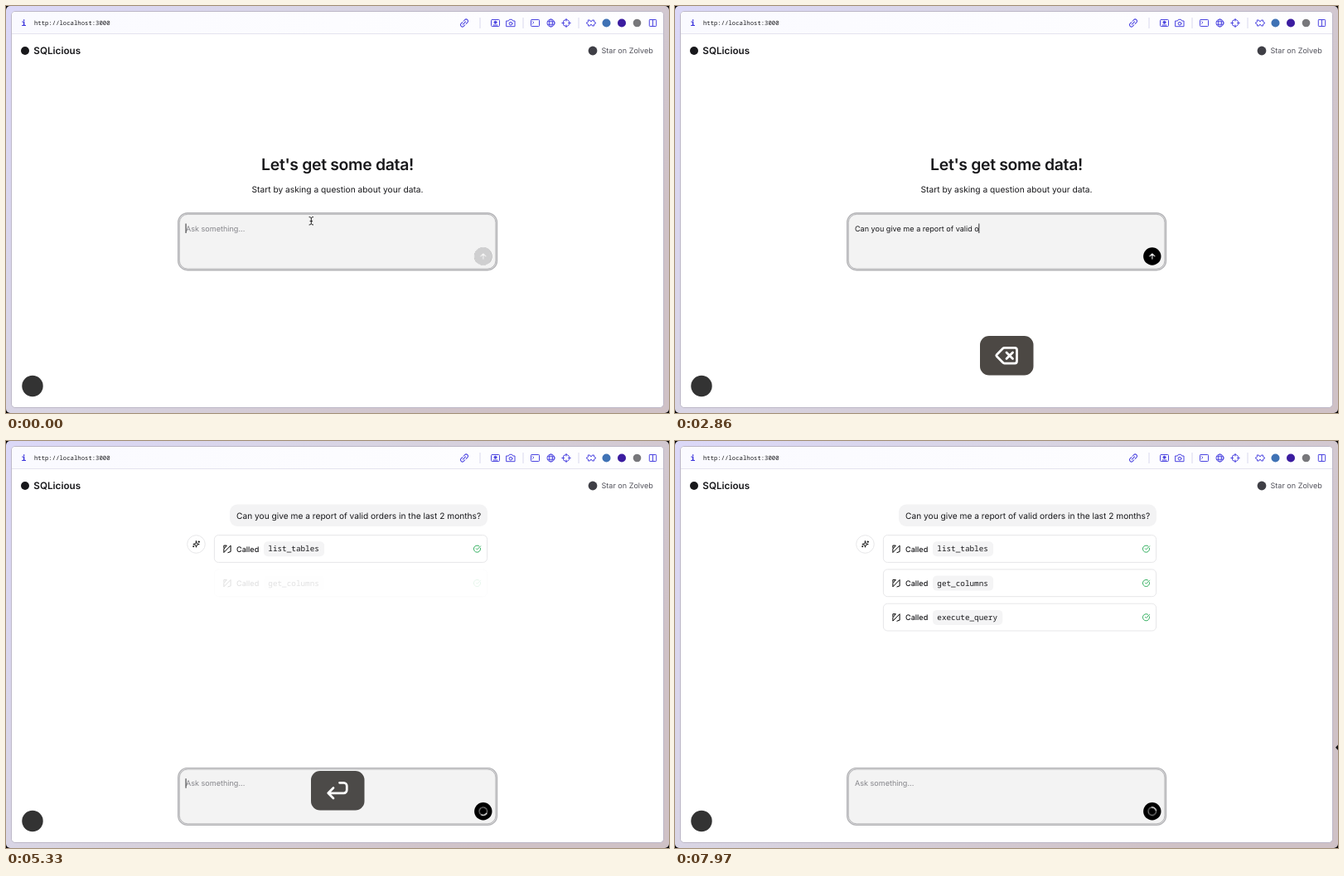
An HTML page that plays this animation: 800 by 491 pixels, repeating every 8 s.

```html
<!DOCTYPE html>
<html lang="en">
<head>
<meta charset="utf-8">
<title>SQLicious</title>
<style>
  html, body { margin: 0; width: 100%; height: 100%; overflow: hidden; background: #000; }
  svg { display: block; width: 800px; height: 491px; }
  text { font-family: Inter, sans-serif; white-space: pre; text-rendering: geometricPrecision; fill: #18181b; }
  .mono { font-family: "Noto Sans Mono", monospace; font-weight: 500; }
  .line { fill: none; stroke: currentColor; stroke-linecap: round; stroke-linejoin: round; }
  .bar { color: #4a43e0; stroke-width: 1; }
  .sep { stroke: #d9d8ee; }

  .home, .chat, .box, .bubble, .row1, .row2, .row3, .edge, .mouse, .idle, .back, .enter { animation: 8s linear infinite; }
  .home { animation-name: home; }
  .chat { animation-name: chat; }
  .box { animation-name: drop; }
  .bubble { animation-name: bubble; }
  .row1 { animation-name: row1; }
  .row2 { animation-name: row2; }
  .row3 { animation-name: row3; }
  .edge { animation-name: edge; }
  .mouse, .idle { animation-name: firstkey; }
  .back { animation-name: back; }
  .enter { animation-name: enter; }
  .spin { animation: spin 1s linear infinite; }

  @keyframes home { 0%, 59.12% { opacity: 1 } 59.13%, 100% { opacity: 0 } }
  @keyframes chat { 0%, 59.12% { opacity: 0 } 59.13%, 100% { opacity: 1 } }
  @keyframes drop { 0%, 59.12% { transform: none } 59.13%, 100% { transform: translateY(144.7px) } }
  @keyframes bubble { 0%, 59.12% { opacity: 0 } 61.5%, 100% { opacity: 1 } }
  @keyframes row1 { 0%, 61% { opacity: 0 } 64%, 100% { opacity: 1 } }
  @keyframes row2 { 0%, 66.25% { opacity: 0 } 69.25%, 100% { opacity: 1 } }
  @keyframes row3 { 0%, 75% { opacity: 0 } 78%, 100% { opacity: 1 } }
  @keyframes edge { 0%, 69% { opacity: 0 } 69.01%, 100% { opacity: 1 } }
  @keyframes firstkey { 0%, 1.24% { opacity: 1 } 1.25%, 100% { opacity: 0 } }
  @keyframes back { 0%, 27% { opacity: 0 } 27.6%, 37% { opacity: 1 } 39%, 100% { opacity: 0 } }
  @keyframes enter { 0%, 58.8% { opacity: 0 } 59.6%, 68% { opacity: 1 } 70%, 100% { opacity: 0 } }
  @keyframes spin { to { transform: rotate(360deg) } }
</style>
</head>
<body>
<svg viewBox="0 0 800 491">
  <defs>
    <linearGradient id="desk" x2="1" y2=".5">
      <stop offset="0" stop-color="#dbd8f8"/>
      <stop offset=".45" stop-color="#d8d4e2"/>
      <stop offset="1" stop-color="#cfc1c6"/>
    </linearGradient>
    <linearGradient id="tools">
      <stop offset="0" stop-color="#fafaff"/>
      <stop offset="1" stop-color="#fefeff"/>
    </linearGradient>
    <path id="spark" d="M12 3l2 7 7 2-7 2-2 7-2-7-7-2 7-2zM20 3v4M22 5h-4M4 17v3M5.500 18.500h-3"/>
    <path id="done" d="M21.800 10A10 10 0 1 1 17 3.335M9 11l3 3L22 4"/>
    <path id="tool" d="M-4.400-1.200V-4.200H-1L-4.400 0V4.200L3.800-4.200V3.200L.600 4.300"/>
    <path id="up" class="line" stroke-width="1.100" d="M0 3.100V-3.100M-3-.100L0-3.100 3-.100"/>
  </defs>

  <!-- window -->
  <rect width="800" height="491" rx="5" fill="url(#desk)"/>
  <rect x="6.500" y="6.500" width="787" height="478" rx="4.500" fill="#fff" stroke="#bdb8c8"/>
  <path d="M7 33.500V11a4 4 0 0 1 4-4H789a4 4 0 0 1 4 4V33.500z" fill="url(#tools)"/>
  <path d="M7 33.500H793" stroke="#e4e3ee"/>

  <!-- browser bar -->
  <text class="mono" x="21.500" y="24" font-size="10" text-anchor="middle" style="fill:#3d35dc;font-weight:700">i</text>
  <text class="mono" x="34" y="23" font-size="7.270">http://localhost:3000</text>
  <g class="sep"><path d="M572 14v13M624 14v13M691 14v13"/></g>
  <g class="line bar">
    <g transform="translate(553 20.500) rotate(-45)">
      <path d="M-1-2.200H-3.200a2.200 2.200 0 0 0 0 4.400H-1M1-2.200H3.200a2.200 2.200 0 0 1 0 4.400H1M-2.400 0h4.800"/>
    </g>
    <g transform="translate(590.500 20.500)">
      <rect x="-5" y="-4" width="10" height="8" rx="1"/>
      <circle cy="-.800" r="1.500" fill="currentColor"/><path d="M-2.500 2.500h5"/>
    </g>
    <g transform="translate(609 20.500)">
      <path d="M-5-2.500h2.400l1-1.700h3.200l1 1.700H5v6.700H-5z"/><circle cy=".700" r="1.900"/>
    </g>
    <g transform="translate(638.500 20.500)">
      <rect x="-5" y="-4" width="10" height="8" rx=".800"/><path d="M-3-1.800l1.300 1.300L-3 .800"/>
    </g>
    <g transform="translate(657.500 20.500)">
      <circle r="4.500"/><ellipse rx="2" ry="4.500"/><path d="M-4-1.700h8M-4 1.700h8"/>
    </g>
    <g transform="translate(676 20.500)">
      <circle r="4"/><path d="M0-5.200v2.700M0 5.200v-2.700M-5.200 0h2.700M5.200 0h-2.700"/>
    </g>
    <path transform="translate(706 20.500)" d="M-3.500-3.500h2a1.500 1.500 0 0 0 3 0h2v2L6 0 3.500 1.500v2h-2a1.500 1.500 0 0 0-3 0h-2v-2L-6 0l2.500-1.500z"/>
    <g transform="translate(780.500 20.500)"><rect x="-4.200" y="-4" width="8.400" height="8" rx=".800"/><path d="M0-4v8"/></g>
  </g>
  <circle cx="724.500" cy="20.500" r="5" fill="#3f72b5"/>
  <circle cx="743" cy="20.500" r="5" fill="#3b1ca0"/>
  <circle cx="761.500" cy="20.500" r="4.800" fill="#77777b"/>

  <!-- page header -->
  <circle cx="23" cy="54" r="5" fill="#18181b"/>
  <text x="33.300" y="58" font-size="11.700" font-weight="600">SQLicious</text>
  <circle cx="708" cy="54" r="5.400" fill="#3f3f46"/>
  <text x="718.500" y="57.200" font-size="9.070" style="fill:#52525b">Star on Zolveb</text>

  <g class="home">
    <text x="400" y="197.500" font-size="19.400" font-weight="600" text-anchor="middle" letter-spacing="-.32">Let's get some data!</text>
    <text x="400" y="225" font-size="10.220" text-anchor="middle">Start by asking a question about your data.</text>
  </g>

  <g class="chat">
    <g class="bubble">
      <rect x="270" y="76.500" width="311" height="26.500" rx="9" fill="#f3f3f4"/>
      <text x="278" y="93.600" font-size="10.190" id="sent"></text>
    </g>
    <g class="row1">
      <circle cx="229.500" cy="124.500" r="10.800" fill="#fff" stroke="#e6e6e8"/>
      <use href="#spark" class="line" stroke-width="2.200" transform="translate(224.600 119.600) scale(.41)"/>
    </g>
    <g id="rows"></g>
  </g>

  <!-- prompt box -->
  <g class="box">
    <rect x="207.700" y="249.700" width="384.800" height="69" rx="11.500" fill="#e2e2e3" stroke="#b5b5b8" stroke-width="1.400"/>
    <rect x="209.300" y="251.300" width="381.600" height="65.800" rx="10" fill="#f3f3f3" stroke="#a0a0a3" stroke-width=".700"/>
    <text id="hint" x="217" y="271.500" font-size="9.070" style="fill:#85858a">Ask something...</text>
    <text id="typed" x="217" y="271.500" font-size="9.070"></text>
    <rect id="caret" x="217" y="262.500" width=".900" height="11.500" fill="#18181b"/>
    <g transform="translate(575.800 302)">
      <circle r="10.700" fill="#000"/>
      <g class="home" color="#fff"><use href="#up"/></g>
      <g class="idle" color="#f5f5f5">
        <circle r="11" fill="#f3f3f3"/><circle r="10.700" fill="#cfcfd0"/><use href="#up"/>
      </g>
      <g class="chat">
        <g class="spin" fill="none" stroke-width="1.400">
          <circle r="4.700" stroke="#777"/>
          <path d="M0-4.700A4.700 4.700 0 0 1 4.700 0" stroke="#fff"/>
        </g>
      </g>
    </g>
  </g>

  <g class="mouse line" color="#222" stroke-width="1">
    <path d="M366 254.500q2 0 2.300 1.300q.300-1.300 2.300-1.300M368.300 255.800v6.800M366 264q2 0 2.300-1.300q.300 1.300 2.300 1.300M367 259.500h2.600"/>
  </g>

  <circle cx="32" cy="458.500" r="12.700" fill="#333"/>

  <!-- pressed keys -->
  <g class="back">
    <rect x="368" y="398" width="64.500" height="47.500" rx="11" fill="#4c4844"/>
    <path class="line" color="#fff" stroke-width="2.200" transform="translate(385 406.700) scale(1.25)" d="M10 4.500H20a2 2 0 0 1 2 2V17.500a2 2 0 0 1-2 2H10a2 2 0 0 1-1.400-.600L2.500 12.700a1 1 0 0 1 0-1.400L8.600 5.100A2 2 0 0 1 10 4.500zM12 9l6 6M18 9l-6 6"/>
  </g>
  <g class="enter">
    <rect x="368" y="398" width="64.500" height="47.500" rx="11" fill="#4c4a48"/>
    <path class="line" color="#fff" stroke-width="2.200" transform="translate(385 406.700) scale(1.25)" d="M14 4.500H18a3 3 0 0 1 3 3V11.500a3 3 0 0 1-3 3H3M8 9.500l-5 5 5 5"/>
  </g>
  <path class="edge" d="M800 366.500l-3 3.200 3 3.200z" fill="#111"/>
</svg>

<script>
  const LOOP = 8000, SUBMIT = 4730;
  const prompt = "Can you give me a report of valid orders in the last 2 months?";
  // [time in ms, characters on screen]
  const keys = [[100, 1], [1460, 18], [1600, 19], [1740, 20], [2060, 26], [2180, 26],
                [2320, 27], [3900, 53], [4000, 54], [4150, 56], [4450, 61], [4590, 62]];
  const $ = id => document.getElementById(id);

  $("sent").textContent = prompt;
  $("rows").innerHTML = ["list_tables", "get_columns", "execute_query"].map((name, i) => `
    <g class="row${i + 1}"><g transform="translate(0 ${i * 41.3})">
      <rect x="251.400" y="113.600" width="329.200" height="32.800" rx="5" fill="#fff" stroke="#e6e6e8"/>
      <use href="#tool" class="line" stroke-width="1" x="267.300" y="130.300"/>
      <text x="278" y="133.600" font-size="9.070" font-weight="500">Called</text>
      <rect x="311" y="121.300" width="${11.5 + name.length * 5.6}" height="18" rx="5" fill="#f4f4f5"/>
      <text class="mono" x="316.300" y="133.400" font-size="9.330">${name}</text>
      <use href="#done" class="line" color="#2fae5c" stroke-width="2.400" transform="translate(563.600 125.200) scale(.41)"/>
    </g></g>`).join("");

  function typedAt(t) {
    if (t < keys[0][0] || t >= SUBMIT) return "";
    if (t >= 2120 && t < 2180) return prompt.slice(0, 26) + "n"; // typo, then backspace
    const i = keys.findLastIndex(k => k[0] <= t);
    const [t0, n0] = keys[i], [t1, n1] = keys[i + 1] || [SUBMIT, n0];
    return prompt.slice(0, Math.floor(n0 + (n1 - n0) * (t - t0) / (t1 - t0) + 1e-6));
  }

  let start;
  function draw(now) {
    start ??= now;
    const t = (now - start) % LOOP, text = typedAt(t), typed = $("typed");
    typed.textContent = text;
    $("hint").style.opacity = text ? 0 : 1;
    $("caret").setAttribute("x", 216.6 + (text ? typed.getComputedTextLength() : 0));
    $("caret").style.opacity = t < SUBMIT || (t - 100) % 1000 < 500 ? 1 : 0;
    requestAnimationFrame(draw);
  }
  requestAnimationFrame(draw);
</script>
</body>
</html>
```
